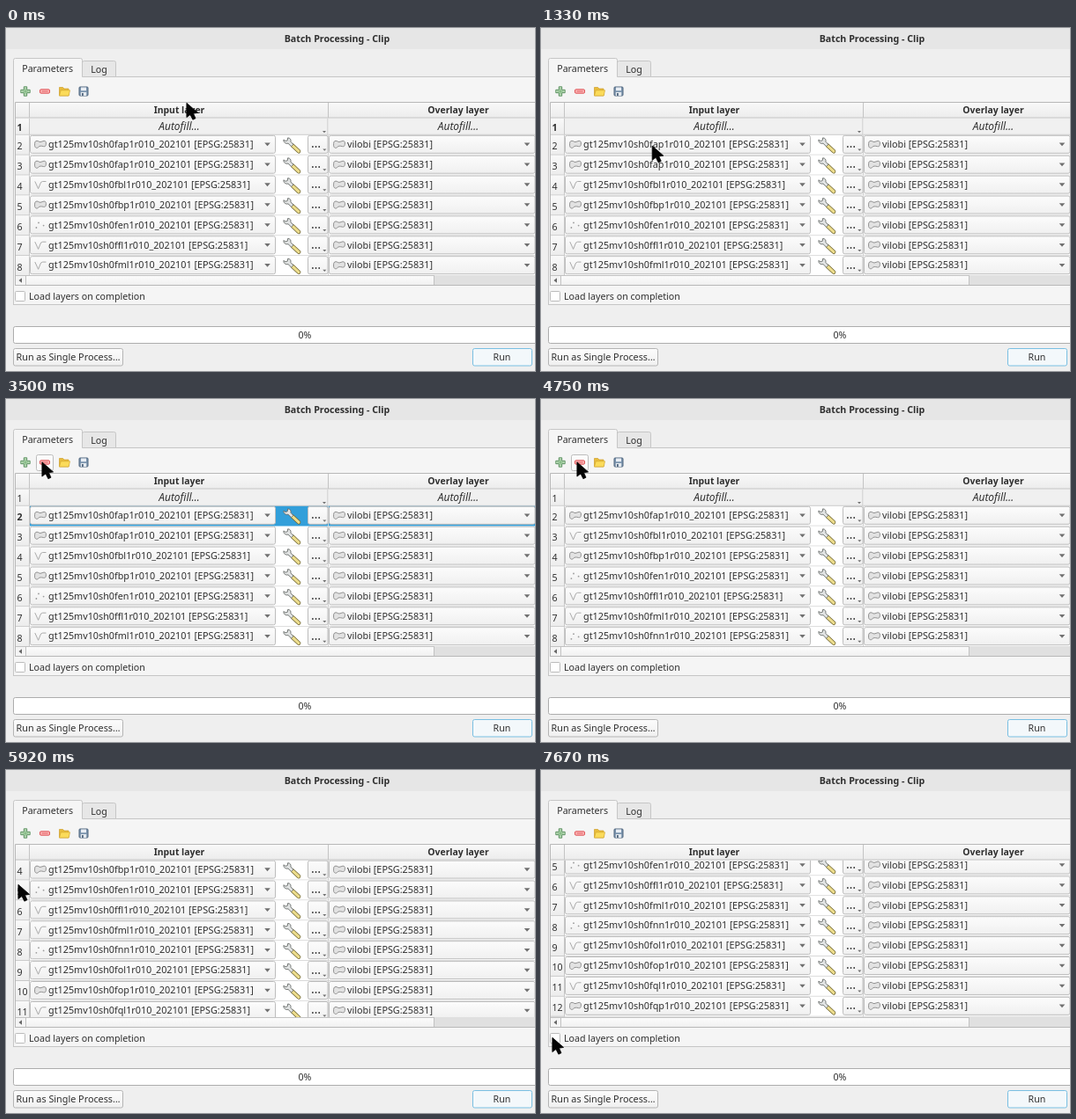
These frames come from a looping animation (600x390 px, 8000 ms). An HTML page:

```html
<!DOCTYPE html>
<html lang="en">
<head>
<meta charset="utf-8">
<title>Batch Processing - Clip</title>
<style>
html, body { margin: 0; width: 100%; height: 100%; overflow: hidden; background: #efefef; }
svg { display: block; width: 600px; height: 390px; }
text { font: 10.65px "Noto Sans", "Open Sans", sans-serif; fill: #2f2f2f; white-space: pre; }
.b { font-weight: 700; }
.h { font-size: 10.4px; font-weight: 700; }
.i { font-size: 11.9px; font-style: italic; }
.c { font-size: 10.8px; }
.d { font-size: 14px; }
.m { text-anchor: middle; }
</style>
</head>
<body>
<svg id="stage" viewBox="0 0 600 390" xmlns="http://www.w3.org/2000/svg">
  <defs>
    <linearGradient id="raised" x2="0" y2="1"><stop stop-color="#fcfcfc"/><stop offset="1" stop-color="#f0f0f0"/></linearGradient>
    <linearGradient id="head" x2="0" y2="1"><stop stop-color="#f9f9f9"/><stop offset="1" stop-color="#ececec"/></linearGradient>
    <clipPath id="view"><rect x="10" y="102.5" width="590" height="178.5"/></clipPath>
    <g id="poly"><path d="M.6 6.4C.4 3 .8.9 3 .9 5 .9 5.200 2.200 7 2.200S9.400.9 11.200.9C13.400.9 13.600 3 13.300 5 13 7 12.200 7.600 10.400 7.200 8 6.600 6 6.400 4.800 8 3.400 9.800.8 9 .6 6.400Z" fill="#e2e2e2" stroke="#868686" stroke-width=".9"/></g>
    <g id="line"><path d="M.8 1.200 4.600 9.500 7.600 2.200Q8.600.8 13.500 1.300" fill="none" stroke="#a2a2a2" stroke-width=".9"/></g>
    <g id="point" fill="#9c9c9c"><circle cx="2.400" cy="8" r=".9"/><circle cx="5" cy="2.400" r=".9"/><circle cx="10.600" cy="5.600" r=".9"/></g>
    <g id="wrench">
      <path d="M11 10.400 18 17" stroke="#6d6330" stroke-width="4.600" stroke-linecap="round"/>
      <path d="M11 10.400 18 17" stroke="#ecdc8c" stroke-width="3.100" stroke-linecap="round"/>
      <path d="M5.600 1.700 5.300 4.500 3 5.300.9 3.800C.5 6.600 3 8.800 6 8L9.500 11.400 11.900 9.200 8.900 6C9.600 3.600 8 1.600 5.600 1.700Z" fill="#e2e4e4" stroke="#686c6a" stroke-width=".9"/>
    </g>
  </defs>
  <g id="back"></g>
  <g id="rows" clip-path="url(#view)"></g>
  <g id="front"></g>
  <g id="tools"></g>
  <path id="cursor" d="M.9 1.300V17.600L5 14.500 7.900 20.200 11 18.700 8.500 13.200 13.600 12.400Z" fill="#050505" stroke="#050505" stroke-width=".8" stroke-linejoin="round"/>
</svg>
<script>
const el = id => document.getElementById(id);
const PITCH = 22.9, TOP = 121.8, EDGE = '#bdbdbd';

const rect = (x, y, w, h, fill, stroke = 'none', r = 0) =>
  `<rect x="${x}" y="${y}" width="${w}" height="${h}" rx="${r}" fill="${fill}" stroke="${stroke}"/>`;
const text = (x, y, s, cls = '') => `<text x="${x}" y="${y}" class="${cls}">${s}</text>`;
const path = (d, fill, stroke = 'none', w = 1) =>
  `<path d="${d}" fill="${fill}" stroke="${stroke}" stroke-width="${w}"/>`;
const use = (id, x, y) => `<use href="#${id}" x="${x}" y="${y}"/>`;
const down = (x, y, r) => path(`M${x - r} ${y - r / 2}h${2 * r}l${-r} ${r * 1.15}z`, '#707070');

const kinds = { p: 'poly', l: 'line', n: 'point' };
const layers = 'ap1 ap1 bl1 bp1 en1 fl1 ml1 nn1 ol1 op1 ql1 qp1'.split(' ');

function combo(x, y, w, kind, label) {
  return rect(x + .5, y + .5, w - 1, 20, 'url(#raised)', EDGE, 2) +
    use(kind, x + 5, y + 5.6) + text(x + 21, y + 14.2, label, 'c') + down(x + w - 9.5, y + 10.4, 3.3);
}

function numberCell(y, h, n, bold) {
  return rect(10, y, 17, h, 'url(#head)') + path(`M10 ${y + h - .5}H27M26.5 ${y}v${h}`, 'none', '#c8c8c8') +
    text(12.4, y + h / 2 + 5, n, bold ? 'b' : '');
}

function autofill(x, w, hover) {
  return rect(x, 102.5, w, 19.3, hover ? '#f9f9f9' : '#f0f0f0') +
    path(`M${x} 121.3h${w}M${x + w - .5} 102.5v19`, 'none', '#c2c2c2');
}

function layerRow(name, i, selected) {
  const y = TOP + i * PITCH;
  const kind = kinds[name[1]];
  return rect(27, y, 573, PITCH, selected ? '#329fda' : '#fff') +
    (selected ? '' : path(`M27 ${y + PITCH - .5}H600`, 'none', '#d8d8d8')) +
    numberCell(y, PITCH, i + 2, selected) +
    combo(27, y, 279, kind, `gt125mv10sh0f${name}r010_202101 [EPSG:25831]`) +
    use('wrench', 314, y + 1.4) +
    rect(342.5, y + .5, 22.5, 20, 'url(#raised)', EDGE, 2) +
    text(346, y + 14.4, '…', 'd') + down(361.3, y + 16.6, 2) +
    path(`M365.5 ${y}v${PITCH}`, 'none', '#cfcfcf') +
    combo(366, y, 234.5, 'poly', 'vilobi [EPSG:25831]');
}

function drawRows(s) {
  const list = s.removed ? layers.slice(1) : layers;
  return `<g transform="translate(0 ${-s.scroll})">` +
    numberCell(102.5, 19.3, 1, !s.touched) +
    autofill(27, 338.5, s.hoverFill) + text(196.5, 116, 'Autofill…', 'i m') + down(361, 118, 2) +
    autofill(365.5, 295, false) + text(513, 116, 'Autofill…', 'i m') +
    list.map((n, i) => layerRow(n, i, s.selected && i === 0)).join('') + '</g>';
}

function drawTools(s) {
  const button = s.hoverMinus
    ? rect(34.5, 63.5, 19, 18, s.pressed ? '#d6d6d6' : '#fbfbfb', '#bcbcbc', 2) : '';
  return button +
    path('M20.3 66.800h3.400v3.500h3.500v3.400h-3.500v3.500h-3.400v-3.500h-3.500v-3.400h3.500z', '#c4dfc0', '#4f8a55', .9) +
    path('M22 68.500v7M18.500 72h7', 'none', '#6fae70', .9) +
    rect(38.5, 69.8, 11, 4.4, '#f9b5b5', '#e0565a', 1.2) + path('M40.500 72h7', 'none', '#e8696c', 1) +
    path('M60.500 67.500h4l1.500 1.500h5V77H60.500z', '#e8bc3c', '#cfa02a', .7) +
    path('M60.500 77 62.200 70.800h10.300L71.200 77z', '#fbdb5a', '#d3a830', .7) +
    rect(83, 67, 10, 10, '#7c95ae', '#50667e', 1) +
    rect(85, 67.5, 6, 3.7, '#e9eef4') + rect(84.8, 73, 6.4, 4, '#e4e9ee') + rect(86, 74, 1.8, 3, '#50667e');
}

el('back').innerHTML =
  rect(0, 0, 600, 390, '#efefef') + rect(0, 0, 600, 24, '#e6e6e6') +
  text(375.5, 15.6, 'Batch Processing - Clip', 'b m') +
  rect(8.5, 55.5, 620, 259, '#f5f5f5', '#c6c6c6') +
  path('M86.5 55.5V39.5q0-2 2-2h34q2 0 2 2v16z', '#e7e7e7', '#c6c6c6') +
  path('M8.5 57V36.5q0-2 2-2h74q2 0 2 2V55.5', '#f5f5f5', '#c6c6c6') + rect(9, 55, 77, 3, '#f5f5f5') +
  text(18.2, 50, 'Parameters') + text(96.3, 51, 'Log') +
  rect(10, 84, 590, 209, '#fff');

el('front').innerHTML =
  rect(10, 84, 590, 18.5, 'url(#head)') +
  path('M10 102H600M26.5 84V102M365.5 84V102', 'none', '#c4c4c4') +
  text(196.5, 97.4, 'Input layer', 'h m') + text(513, 97.4, 'Overlay layer', 'h m') +
  rect(10, 281, 590, 12, '#e0e0e0') +
  rect(22.5, 281.5, 463, 11, 'url(#raised)', '#c2c2c2') +
  rect(10.5, 281.5, 12, 11, '#f4f4f4', '#c2c2c2') + path('M18 284.3v5.4l-3.500-2.700z', '#666') +
  path('M600 84.5H10.5V292.5H600', 'none', '#b8b8b8') +
  rect(10.5, 299.5, 11, 11, '#fff', '#bbb', 1) + text(26, 309, 'Load layers on completion') +
  rect(8.5, 339.5, 661, 19, '#fff', '#adadad', 2) + text(339, 353, '0%', 'm') +
  rect(8.5, 364.5, 124, 19.5, 'url(#raised)', '#b4b4b4', 2) + text(11.5, 378, 'Run as Single Process…', 'c') +
  rect(529.5, 364.5, 67, 19.5, '#f3f8fb', '#79bfe2', 2) + text(562.5, 378, 'Run', 'm');

const smooth = p => p * p * (3 - 2 * p);
const out = p => 1 - (1 - p) * (1 - p);
// first tick, ticks taken, end point, easing, sideways bow
const moves = [
  [1, 6, 126, 131.5, smooth, 0],
  [10, 4, 126, 150, smooth, 0],
  [15, 4, 125, 127, out, 0],
  [21, 6, 14.5, 128, smooth, 0],
  [37, 6, 40, 70.5, smooth, 0],
  [62, 7, 13, 129, smooth, 9],
  [81, 10, 12, 302, smooth, -1],
  [92, 1, 12, 303, smooth, 0],
];

function pointer(tick) {
  let x = 204, y = 84;
  for (const [start, n, tx, ty, ease, bow] of moves) {
    if (tick < start) break;
    const p = ease(Math.min(1, (tick - start + 1) / n));
    x += (tx - x) * p + bow * Math.sin(Math.PI * p);
    y += (ty - y) * p;
  }
  return [x, y];
}

let lastKey = '';
function render(ms) {
  const tick = Math.floor((ms + 3.5) * 12 / 1000);
  const [x, y] = pointer(tick);
  const state = {
    touched: tick >= 32,
    selected: tick >= 32 && tick < 57,
    removed: tick >= 57,
    scroll: tick >= 73 ? 93 : tick >= 71 ? 65 : 0,
    hoverFill: tick < 71 && x >= 27 && x < 365 && y >= 102.5 && y < 121.8,
    hoverMinus: x >= 34 && x < 54 && y >= 63 && y < 82,
    pressed: tick === 52,
  };
  const key = JSON.stringify(state);
  if (key !== lastKey) {
    el('rows').innerHTML = drawRows(state);
    el('tools').innerHTML = drawTools(state);
    lastKey = key;
  }
  el('cursor').setAttribute('transform', `translate(${x.toFixed(2)} ${y.toFixed(2)})`);
}

const begin = performance.now();
function loop() {
  render((performance.now() - begin) % 8000);
  requestAnimationFrame(loop);
}
loop();
</script>
</body>
</html>
```
